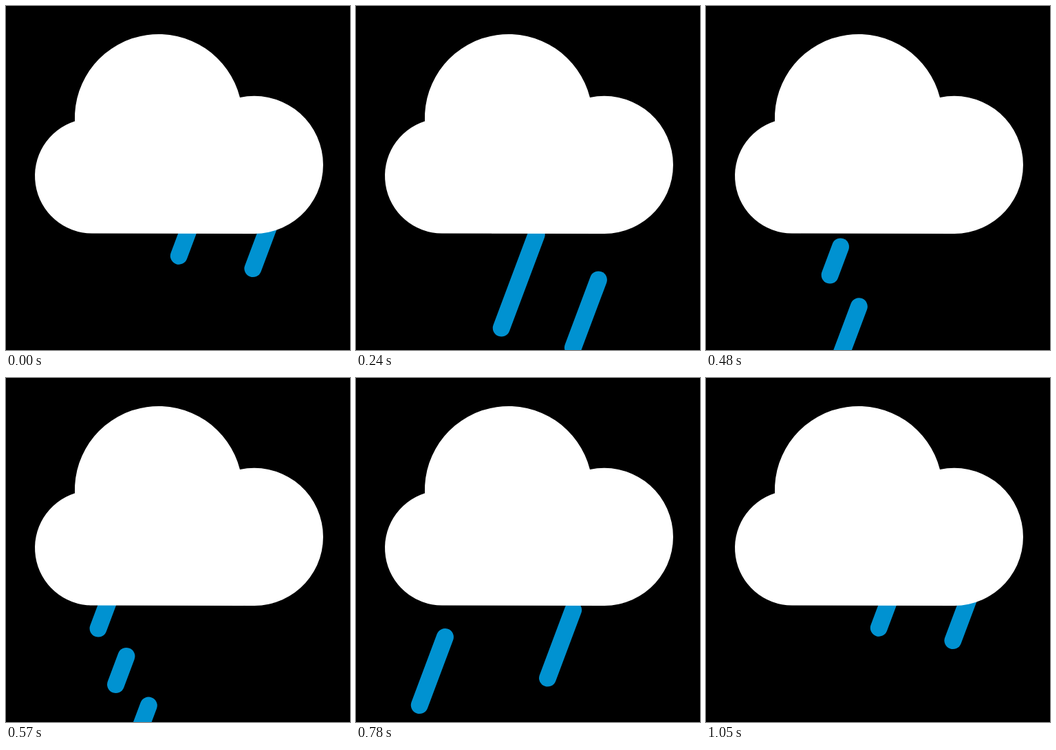
Write an HTML page that moves like this. It is 500 by 500 pixels and loops after 1080 ms.

```html
<!DOCTYPE html>
<html lang="en">
<head>
<meta charset="utf-8">
<title>Rain cloud</title>
<style>
  html, body { margin: 0; width: 100%; height: 100%; overflow: hidden; background: #000; }
  svg { display: block; width: 100%; height: 100%; }
</style>
</head>
<body>
<svg viewBox="0 0 500 500">
  <g id="rain" stroke="#0092d1" stroke-width="25" stroke-linecap="round"></g>
  <path fill="#fff" d="M125 330.5A83.5 83.5 0 0 1 100 167.5A121.9 121.9 0 0 1 340 133A100.1 100.1 0 1 1 361 331Z"/>
</svg>
<script>
const LOOP = 1080, STEP = 30, CYCLE = 1050;
const SLANT = -0.375;

// Each drop leaves the cloud at `start`; its upper end is at (x, y) at time `at`.
const drops = [
  { start: -130, at: 240, x: 262.3, y: 332, vx: -0.1667, vy: 0.4367, height: 136 },
  { start: -150, at: 240, x: 352.4, y: 398, vx: -0.181, vy: 0.479, height: 98.5 },
  { start: 350, at: 480, x: 195.5, y: 350, vx: -0.2289, vy: 0.6056, height: 41 },
  { start: 450, at: 870, x: 111.5, y: 424.3, vx: -0.199, vy: 0.531, height: 99 },
  { start: 590, at: 870, x: 293, y: 396.3, vx: -0.252, vy: 0.658, height: 99 }
];

const rain = document.getElementById("rain");
for (const drop of drops) {
  drop.line = document.createElementNS("http://www.w3.org/2000/svg", "line");
  rain.append(drop.line);
}

const mod = (a, n) => ((a % n) + n) % n;

function render(time) {
  const t = Math.floor((time % LOOP) / STEP) * STEP;
  for (const { line, start, at, x, y, vx, vy, height } of drops) {
    const elapsed = start + mod(t - start, CYCLE) - at;
    const x1 = x + vx * elapsed, y1 = y + vy * elapsed;
    line.setAttribute("x1", x1);
    line.setAttribute("y1", y1);
    line.setAttribute("x2", x1 + SLANT * height);
    line.setAttribute("y2", y1 + height);
  }
}

const origin = performance.now();
function tick() {
  render(performance.now() - origin);
  requestAnimationFrame(tick);
}
tick();
</script>
</body>
</html>
```
